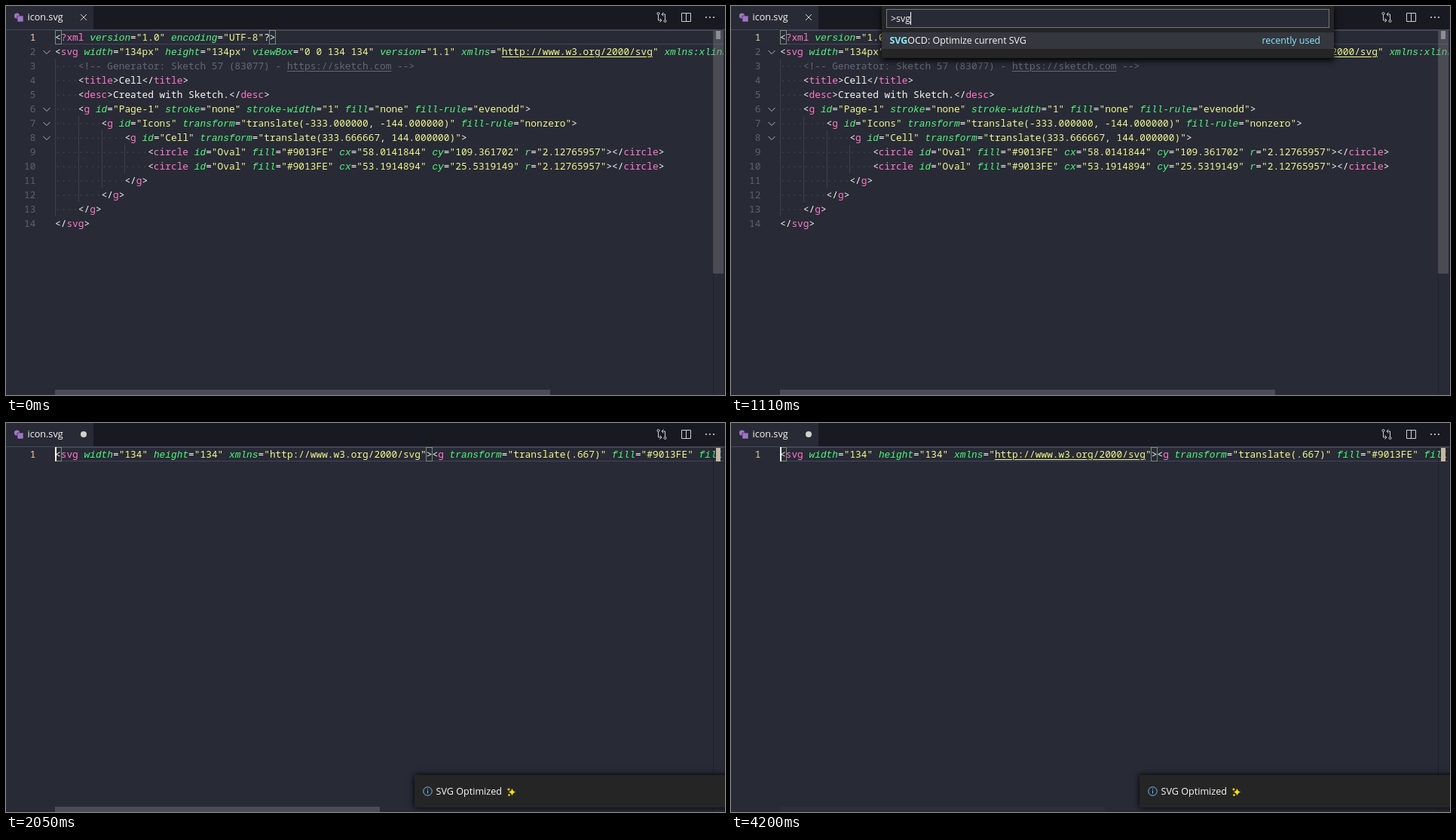
Recreate the animation shown at these times as an HTML page. Size 954 by 516 pixels, loop 4470 ms.

```html
<!DOCTYPE html>
<html lang="en">
<head>
<meta charset="utf-8">
<title>icon.svg</title>
<style>
html, body { margin: 0; width: 100%; height: 100%; overflow: hidden; background: #282a36; }
#stage { position: relative; width: 954px; height: 516px; overflow: hidden; background: #282a36;
  font: 12.6px/20px "Open Sans", "Noto Sans", sans-serif; color: #f8f8f2; }
#stage div, #stage svg { position: absolute; }
svg { left: 0; top: 0; fill: none; stroke-width: 1; }
.page { left: 0; top: 0; width: 954px; height: 516px; }
.line, .num { font: 500 12.83px/19px "Noto Sans Mono", monospace; white-space: pre; height: 19px; }
.line { left: 65px; width: 887px; overflow: hidden; }
.num { left: 0; width: 39.5px; text-align: right; color: #5e616e; }
.num.on { color: #f1d0a5; }
.tag { color: #ff79c6; }
.attr { color: #50fa7b; font-family: "Liberation Mono", monospace; font-style: italic; }
.str { color: #f1fa8c; }
.note { color: #666975; }
.dots { color: #444754; }
.link { text-decoration: underline; text-underline-offset: 2px; }
.guide { width: 1px; background: #3d3f4c; }
.match { width: 7px; height: 17px; border: 1px solid #74907a; }
.current { left: 65px; top: 32px; width: 887px; height: 17px; border: solid #44475a; border-width: 1px 0; }
.panel { left: 200px; top: 0; width: 600px; background: #252526; box-shadow: 0 3px 8px #000; font-size: 12.45px; }
.input { left: 6px; top: 4px; width: 581px; height: 23px; padding-left: 5px; border: 1px solid #73757f;
  background: #282a36; line-height: 24px; }
.input i { display: inline-block; width: 1px; height: 17px; background: #fff; vertical-align: -4px; }
.row { left: 0; width: 600px; height: 22px; line-height: 22px; text-indent: 10.5px; white-space: pre; }
.row b, .hint { color: #8be9fd; }
.hint { right: 18px; top: 0; text-indent: 0; }
.toast { left: 542px; top: 467px; width: 450px; height: 43px; background: #252526; box-shadow: 0 0 8px #000; }
</style>
</head>
<body>
<div id="stage"></div>
<script>
const LOOP = 4470;
const stage = document.getElementById('stage');

function add(parent, cls, css = '', text = '', tag = 'div') {
  const el = document.createElement(tag);
  el.className = cls;
  el.style.cssText = css;
  el.textContent = text;
  parent.append(el);
  return el;
}
const box = (parent, x, y, w, h, color) =>
  add(parent, '', `left:${x}px;top:${y}px;width:${w}px;height:${h}px;background:${color}`);

function draw(parent, w, h, body) {
  const holder = add(parent, '', 'left:0;top:0');
  holder.innerHTML = `<svg width="${w}" height="${h}">${body}</svg>`;
  return holder;
}

// steps: [ms, properties, easing]; changes are hard unless an easing is given
function play(el, steps) {
  const keys = steps.map(([ms, props, easing = 'step-end']) => ({ ...props, easing, offset: ms / LOOP }));
  keys.push({ ...keys[keys.length - 1], offset: 1 });
  el.animate(keys, { duration: LOOP, iterations: Infinity });
}
// visible between each pair of times
function show(el, ...times) {
  const steps = times.map((ms, i) => [ms, { opacity: 1 - i % 2 }]);
  if (times[0] > 0) steps.unshift([0, { opacity: 0 }]);
  play(el, steps);
}

// Code -----------------------------------------------------------------
function span(parent, cls, text) {
  const el = add(parent, cls, '', '', 'span');
  let link = null;
  text.split(/(https?:[^"\s]+)/).forEach((part, i) => {
    if (i % 2) link = add(el, 'link', '', part, 'span');
    else el.append(part);
  });
  return link;
}

// Writes one highlighted line and returns its links
function codeLine(page, n, text) {
  const top = 32 + 19 * (n - 1);
  add(page, n === 1 ? 'num on' : 'num', `top:${top}px`, n);
  const line = add(page, 'line', `top:${top}px`);
  const links = [];
  let place = 'text';
  for (const [tok] of text.matchAll(/^ +|<!--.*-->|"[^"]*"|<\/?|\??>|=|\??[\w:.-]+|./g)) {
    let cls = '';
    if (/^ {2,}/.test(tok)) {
      span(line, 'dots', '·'.repeat(tok.length));
      continue;
    }
    if (tok.startsWith('<!')) cls = 'note';
    else if (tok[0] === '<') place = 'tag';
    else if (tok.endsWith('>')) place = 'text';
    else if (tok[0] === '"') cls = 'str';
    else if (/\w/.test(tok) && place !== 'text') {
      cls = place;
      place = 'attr';
    }
    const link = span(line, cls, tok);
    if (link) links.push(link);
  }
  return links;
}

const chevrons = (page, rows) => draw(page, 65, 516, rows.map(n =>
  `<path d="M49.500 ${21 + 19 * n}l4.500 4.500 4.500-4.500" stroke="#b4b5b8"/>`).join(''));

function matches(page, ...cols) {
  for (const c of cols) add(page, 'match', `left:${64.5 + 7.7 * c}px;top:32px`);
}

const SOURCE = `<?xml version="1.0" encoding="UTF-8"?>
<svg width="134px" height="134px" viewBox="0 0 134 134" version="1.1" xmlns="http://www.w3.org/2000/svg" xmlns:xlink="http://www.w3.org/1999/xlink">
    <!-- Generator: Sketch 57 (83077) - https://sketch.com -->
    <title>Cell</title>
    <desc>Created with Sketch.</desc>
    <g id="Page-1" stroke="none" stroke-width="1" fill="none" fill-rule="evenodd">
        <g id="Icons" transform="translate(-333.000000, -144.000000)" fill-rule="nonzero">
            <g id="Cell" transform="translate(333.666667, 144.000000)">
                <circle id="Oval" fill="#9013FE" cx="58.0141844" cy="109.361702" r="2.12765957"></circle>
                <circle id="Oval" fill="#9013FE" cx="53.1914894" cy="25.5319149" r="2.12765957"></circle>
            </g>
        </g>
    </g>
</svg>`.split('\n');

const SMALL = '<svg width="134" height="134" xmlns="http://www.w3.org/2000/svg"><g transform="translate(.667)" fill="#9013FE" fill-rule="nonzero">';

// Frame of the editor ----------------------------------------------------
box(stage, 0, 0, 954, 32, '#191a21');
box(stage, 0, 0, 116, 31, '#282a36');
box(stage, 0, 31, 954, 1, '#44475a');
add(stage, 'current');
box(stage, 938, 33, 1, 483, '#1e2029');
box(stage, 953, 33, 1, 483, '#1e2029');
add(stage, '', 'left:28.5px;top:5px', 'icon.svg');
draw(stage, 954, 32, `
  <g fill="#a074c4"><circle cx="14.5" cy="13" r="3.6"/><path d="M15 13h8v8h-8z" stroke="#282a36" stroke-width=".6"/></g>
  <g stroke="#d0d0d2">
    <path d="M896.500 9.500h12v11h-12zM902.500 9.500v11"/>
    <path d="M865.500 11.500v7.500h4M867.500 16.500l2.500 2.500-2.500 2.500M874.500 18.500v-7.500h-4M872.500 8.500l-2.500 2.500 2.500 2.500"/>
    <circle cx="865.500" cy="10" r="1.500"/><circle cx="874.500" cy="20" r="1.500"/>
  </g>
  <g fill="#d0d0d2"><circle cx="929" cy="15" r="1.100"/><circle cx="934" cy="15" r="1.100"/><circle cx="939" cy="15" r="1.100"/></g>`);

// Long file ------------------------------------------------------------
const before = add(stage, 'page');
[[3, 13], [7, 12], [8, 11], [9, 10]].forEach(([from, to], i) =>
  add(before, 'guide', `left:${65 + Math.round(30.8 * i)}px;top:${13 + 19 * from}px;height:${19 * (to - from + 1)}px`));
matches(before, 0, 37);
SOURCE.forEach((text, i) => codeLine(before, i + 1, text));
chevrons(before, [2, 6, 7, 8]);
draw(before, 116, 32, '<path d="M99 11l8 8M107 11l-8 8" stroke="#d8d8d8"/>');
box(before, 938, 33, 14, 322, 'rgba(121,121,125,.42)');
box(before, 942, 33, 6, 11, '#8d8e93');
show(before, 0, 1630);

// Short file -----------------------------------------------------------
const after = add(stage, 'page');
matches(after, 0, 64);
const [link] = codeLine(after, 1, SMALL);
play(link, [[0, { textDecorationColor: 'transparent' }], [2670, { textDecorationColor: '#f1fa8c' }]]);
show(chevrons(after, [1]), 1630, 1900);
draw(after, 116, 32, '<circle cx="103" cy="15" r="4" fill="#d2d2cc"/>');
box(after, 942, 33, 6, 18, '#c4b7a4');
show(after, 1630);

const caret = box(stage, 65, 32, 2, 19, '#f8f8f0');
show(caret, 1420, 2510, 3000, 3510, 4130);

const slider = box(stage, 65, 509, 657, 7, '#4a4c56');
play(slider, [
  [0, { width: '657px', opacity: 1 }],
  [1900, { width: '431px', opacity: 1 }],
  [4130, { width: '431px', opacity: .5 }],
  [4200, { width: '431px', opacity: .12 }],
]);

// Command list: matched letters stand between asterisks ------------------
const COMMANDS = [
  '*SV*GOCD: Optimize current SVG',
  'Debug: Focus on Call *S*tack *V*iew',
  'Explorer: Focus on Npm *S*cripts *V*iew',
  'Extensions: Install *S*pecific *V*ersion of Extension...',
  'GitLens: Focus on *S*earch Commits *V*iew',
  'GitLens: *S*how Compare *V*iew',
  'GitLens: *S*how File History *V*iew',
  'GitLens: *S*how Line History *V*iew',
  'GitLens: *S*how Repositories *V*iew',
];

function panel(query, rows, height, from, to) {
  const el = add(stage, 'panel', `height:${height}px`);
  add(add(el, 'input', '', query), '', '', '', 'i');
  rows.forEach((text, i) => {
    const row = add(el, 'row', `top:${35 + 22 * i + (i ? 1 : 0)}px`);
    text.split('*').forEach((part, k) => add(row, '', '', part, k % 2 ? 'b' : 'span'));
    if (i === 0) row.style.background = '#34373e';
    if (i < 2) add(row, 'hint', '', i ? 'other commands' : 'recently used');
  });
  if (rows.length > 1) box(el, 0, 57, 600, 1, '#a9aab2');
  show(el, from, to);
}
panel('>', [], 35, 410, 480);
panel('>', COMMANDS.map(c => c.replaceAll('*', '')), 239, 480, 1010);
panel('>sv', COMMANDS, 239, 1010, 1110);
panel('>svg', ['*SVG*OCD: Optimize current SVG'], 69, 1110, 1420);

// Notification -----------------------------------------------------------
const notice = add(stage, 'page');
const toast = add(notice, 'toast');
const star = (x, y, r) => `<path d="M${x} ${y - r}q${r * .15} ${r * .85} ${r} ${r}q${-r * .85} ${r * .15} ${-r} ${r}q${-r * .15} ${-r * .85} ${-r} ${-r}q${r * .85} ${-r * .15} ${r} ${-r}"/>`;
draw(toast, 150, 43, `<g stroke="#75beff"><circle cx="17.500" cy="21.500" r="5.700"/><path d="M17.500 20.500v4M17.500 18v1.300"/></g>
  <g fill="#fce100">${star(129.5, 22.5, 5)}${star(125, 19, 2.2)}${star(125.5, 26.5, 2)}</g>`);
add(toast, '', 'left:28.5px;top:12px;white-space:pre', 'SVG Optimized');
play(toast, [
  [0, { opacity: 0, transform: 'translateY(43px)' }],
  [1595, { opacity: 0, transform: 'translateY(43px)' }, 'ease-out'],
  [1895, { opacity: 1, transform: 'translateY(0)' }],
]);
play(toast, [[0, { background: '#252526' }], [3230, { background: '#33353e' }], [3380, { background: '#252526' }]]);
show(notice, 1630);
</script>
</body>
</html>
```
